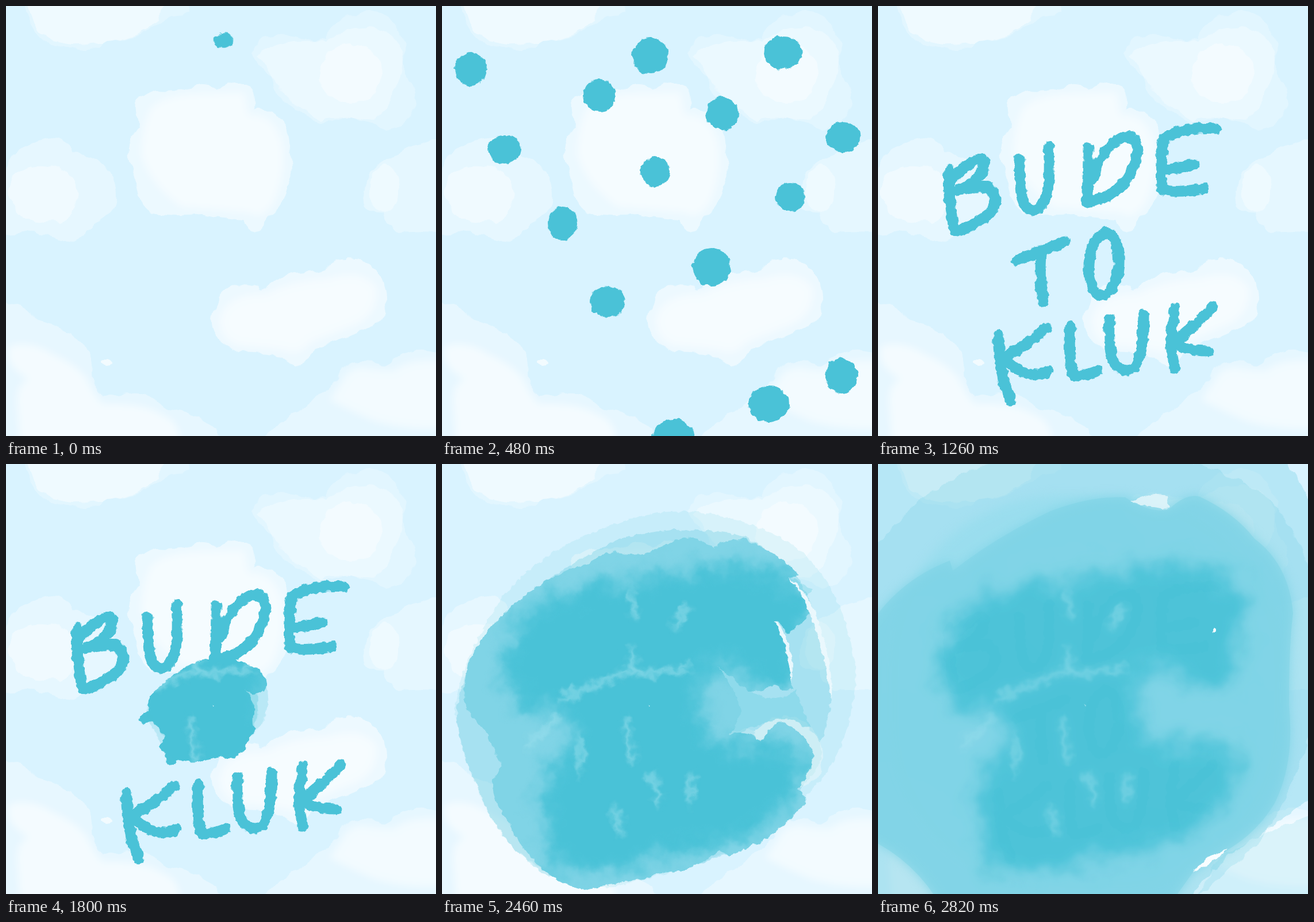
Write an HTML page without scripts that moves like this. It is 748 px wide and 748 px high and loops after 3 s.

```html
<!DOCTYPE html>
<html lang="cs">
<head>
<meta charset="utf-8">
<title>Bude to kluk</title>
<style>
html, body { margin: 0; width: 100%; height: 100%; overflow: hidden; background: #d9f3ff; }
svg { display: block; width: 100%; height: 100%; }
filter { color-interpolation-filters: sRGB; }

.dots ellipse, .ink g, .phase, .grow { animation: 3s -2ms infinite; }

/* --u / --v: drift and fall per 60 ms step, --g: growth per step */
.dots ellipse { fill: #4ac2d7; animation-name: fall; animation-timing-function: steps(17, end); }
@keyframes fall {
  0% { transform: translate(calc(var(--x) - 8 * var(--u)), calc(var(--y) - 8 * var(--v))) scale(calc(1 - 8 * var(--g))); }
  34%, to { transform: translate(calc(var(--x) + 9 * var(--u)), calc(var(--y) + 9 * var(--v))) scale(calc(1 + 9 * var(--g))); }
}

.ink { fill: none; stroke: #4ac2d7; stroke-width: 19; stroke-linecap: round; stroke-linejoin: round; }
.ink g, .phase { animation-timing-function: step-end; }
.ink .w1 { animation-name: w1; }
.ink .w2 { animation-name: w2; }
.ink .w3 { animation-name: w3; }
.ink .w4 { animation-name: w4; }
.ink .w5 { animation-name: w5; }
@keyframes w1 { 0% { visibility: hidden } 34%, to { visibility: visible } }
@keyframes w2 { 0% { visibility: hidden } 36%, to { visibility: visible } }
@keyframes w3 { 0% { visibility: hidden } 38%, to { visibility: visible } }
@keyframes w4 { 0% { visibility: hidden } 40%, to { visibility: visible } }
@keyframes w5 { 0% { visibility: hidden } 42%, to { visibility: visible } }

.pa { animation-name: showA; }
.pb { animation-name: showB; }
.pc { animation-name: showC; }
@keyframes showA { 0% { visibility: hidden } 54% { visibility: visible } 72%, to { visibility: hidden } }
@keyframes showB { 0% { visibility: hidden } 72% { visibility: visible } 84%, to { visibility: hidden } }
@keyframes showC { 0% { visibility: hidden } 84%, to { visibility: visible } }

.grow { transform-origin: 355px 425px; }
.ga { animation-name: growA; }
.gb { animation-name: growB; }
.gc { animation-name: growC; }
@keyframes growA { 0%, 54% { transform: scale(.15); animation-timing-function: steps(9, jump-none) } 72%, to { transform: scale(1) } }
@keyframes growB { 0%, 72% { transform: scale(.73); animation-timing-function: steps(6, jump-none) } 84%, to { transform: scale(1) } }
@keyframes growC { 0%, 84% { transform: scale(.84); animation-timing-function: steps(6, jump-none) } 96%, to { transform: scale(1) } }
</style>
</head>
<body>
<svg viewBox="0 0 748 748" role="img" aria-label="Bude to kluk">
<defs>
  <filter id="rough" filterUnits="userSpaceOnUse" x="-20" y="-20" width="788" height="788">
    <feTurbulence type="fractalNoise" baseFrequency=".09" numOctaves="2" seed="4"/>
    <feDisplacementMap in="SourceGraphic" scale="9" xChannelSelector="R" yChannelSelector="G"/>
  </filter>
  <filter id="puff" filterUnits="userSpaceOnUse" x="-40" y="-40" width="828" height="828">
    <feTurbulence type="fractalNoise" baseFrequency=".045" numOctaves="2" seed="9"/>
    <feDisplacementMap in="SourceGraphic" scale="14" xChannelSelector="R" yChannelSelector="G"/>
  </filter>
  <filter id="mist" filterUnits="userSpaceOnUse" x="-40" y="-40" width="828" height="828">
    <feGaussianBlur stdDeviation="7"/>
  </filter>
  <filter id="soft" filterUnits="userSpaceOnUse" x="-60" y="-60" width="868" height="868">
    <feGaussianBlur stdDeviation="15" result="b"/>
    <feTurbulence type="fractalNoise" baseFrequency=".02" numOctaves="3" seed="2"/>
    <feDisplacementMap in="b" scale="60" xChannelSelector="R" yChannelSelector="G"/>
  </filter>
  <filter id="vein" filterUnits="userSpaceOnUse" x="0" y="0" width="748" height="748">
    <feGaussianBlur stdDeviation="5" result="b"/>
    <feTurbulence type="fractalNoise" baseFrequency=".05" numOctaves="2" seed="6"/>
    <feDisplacementMap in="b" scale="30" xChannelSelector="R" yChannelSelector="G"/>
  </filter>
  <filter id="haze" filterUnits="userSpaceOnUse" x="-60" y="-60" width="868" height="868">
    <feGaussianBlur stdDeviation="9"/>
  </filter>

  <clipPath id="coreA"><path class="grow ga" d="M122 415Q130 380 150 360Q200 310 245 285Q300 245 360 238Q390 234 420 240Q470 245 505 265Q540 280 557 305Q568 330 560 350Q545 370 520 373Q495 365 483 350Q505 375 518 410Q525 440 510 460Q510 490 525 505Q515 515 495 530Q470 570 440 585Q400 610 330 618Q300 630 250 620Q205 605 195 595Q165 570 170 560Q180 545 195 537Q150 490 130 435Z"/></clipPath>
  <clipPath id="coreB"><path class="grow gb" d="M45 348Q70 290 130 240Q190 190 250 175Q280 155 300 152Q330 165 370 150Q410 128 435 127Q455 133 472 147Q490 130 525 131Q580 150 622 193Q612 198 602 198Q630 225 639 260Q620 285 600 295Q590 275 578 272Q605 325 610 390Q600 397 590 393Q580 380 563 390Q545 400 530 393Q500 370 480 352Q510 390 520 430Q510 460 500 470Q530 460 555 482Q575 450 592 448Q635 470 647 505Q640 545 617 565Q635 575 632 590Q600 625 560 655Q520 675 498 682L485 672Q440 700 420 708Q400 705 350 722Q300 730 250 740Q210 735 175 705Q130 660 117 625Q85 580 88 550Q95 535 105 525Q90 500 80 470Q50 440 38 415Q38 380 45 348Z"/></clipPath>
  <clipPath id="coreC"><path class="grow gc" d="M-20 290Q30 205 125 168L130 186Q200 130 300 82Q370 55 430 58Q470 85 505 80Q535 50 560 57Q620 85 655 130Q715 175 722 260Q715 310 715 420Q725 520 690 590Q660 640 610 670L548 710L505 770H110Q65 690 -20 650Z"/></clipPath>

  <g id="paint">
    <rect x="-20" y="-20" width="788" height="788" fill="#80d4e6"/>
    <path filter="url(#soft)" fill="#49c2d7" d="M104 370Q110 300 150 255Q190 215 240 215Q340 195 450 180Q570 165 635 215Q645 270 615 380Q560 395 485 350Q440 370 455 440Q470 500 540 488L630 490Q640 580 540 645Q420 690 330 695Q250 720 205 710Q165 650 178 590Q165 550 200 530Q240 480 200 425Q110 440 104 370Z"/>
    <path filter="url(#vein)" fill="none" stroke="#9adfed" stroke-opacity=".75" stroke-width="9" stroke-linecap="round" d="M330 225L334 268M328 325L335 360M210 410Q260 380 330 362Q400 365 430 355M425 248L405 285M320 445L330 515M200 440L150 490M242 475L238 535M365 540L378 590M302 600L312 640M433 540V585"/>
    <path fill="#c8eff6" d="M358 417l4 3-1 2z"/>
  </g>
</defs>

<rect width="748" height="748" fill="#d9f3ff"/>

<g filter="url(#puff)" fill="#fff">
  <path opacity=".25" d="M32 -12Q40 45 75 65Q105 75 135 78Q165 72 170 62Q215 60 240 45Q270 30 285 18L318 14L322 -12Z"/>
  <path opacity=".45" d="M38 -12Q45 40 78 60Q110 70 140 66Q215 60 240 42Q268 30 285 -12Z"/>
  <path opacity=".25" d="M427 82Q432 60 450 55Q475 47 505 52Q535 62 555 58Q560 40 580 25Q610 10 640 9Q670 14 680 38Q697 60 694 85Q688 100 695 110Q694 130 705 135Q718 165 708 185Q690 212 660 214Q630 200 590 192Q570 203 545 202Q520 195 500 175Q465 155 463 122Q440 108 427 82Z"/>
  <path opacity=".3" d="M437 85Q475 55 555 62Q600 28 650 40Q690 60 690 85Q695 120 672 150Q668 180 640 198Q590 190 545 198Q485 165 463 122Z"/>
  <ellipse opacity=".4" cx="600" cy="118" rx="54" ry="52"/>
  <path opacity=".5" d="M227 170Q240 150 265 147Q300 150 325 142Q345 128 365 145Q385 130 415 135Q435 140 432 180Q460 175 475 192Q492 215 492 240Q500 270 497 290Q488 320 480 345Q470 362 452 368Q450 392 432 393Q418 388 413 374Q375 372 340 364Q290 370 255 360Q225 340 227 300Q212 275 215 245Q220 220 232 208Q225 185 227 170Z"/>
  <path opacity=".35" d="M0 290Q5 270 18 255Q50 230 80 228Q115 232 117 256Q150 258 170 275Q192 300 190 340Q185 365 155 378Q135 405 108 411Q80 405 50 390Q25 398 -12 398V290Z"/>
  <path opacity=".4" d="M5 325Q8 275 65 278Q120 280 125 325Q120 365 95 375Q50 378 30 370Q5 350 5 325Z"/>
  <path opacity=".33" d="M762 230Q700 240 680 260Q635 275 632 300Q615 325 625 350Q640 362 655 360Q660 385 685 395Q715 390 762 394Z"/>
  <ellipse opacity=".35" cx="658" cy="318" rx="24" ry="41"/>
  <path opacity=".52" d="M358 545Q362 510 385 492Q410 478 445 492Q470 470 500 465Q530 465 553 458Q570 437 595 440Q630 440 650 465Q664 490 662 525Q655 550 625 562Q590 580 540 594Q530 622 502 626Q480 615 465 606Q430 600 405 602Q370 590 365 572Q357 560 358 545Z"/>
  <path opacity=".38" d="M-12 510Q35 522 55 545Q110 560 135 590Q155 605 150 640Q150 660 168 682Q200 672 235 674Q262 685 275 698Q320 705 345 722Q378 735 380 762H-12Z"/>
  <ellipse opacity=".65" cx="175" cy="620" rx="9" ry="5"/>
  <path opacity=".35" d="M440 762Q480 720 510 705Q535 680 560 668Q575 650 585 632Q610 608 640 620Q660 628 672 622Q680 605 710 600Q735 598 762 606V762Z"/>
</g>
<g filter="url(#mist)" fill="#fff">
  <path opacity=".48" d="M250 180Q265 157 330 152L415 150L422 190Q465 185 480 235Q490 290 465 345Q440 375 425 360Q370 355 305 350Q250 310 235 260Q235 215 250 180Z"/>
  <path opacity=".48" d="M372 545Q380 500 455 500Q490 478 560 474Q620 455 645 490Q650 540 600 558L530 585Q510 612 480 598L400 590Q370 575 372 545Z"/>
  <path opacity=".55" d="M20 700Q15 655 40 650Q-5 625 5 592Q40 580 80 605Q125 625 142 650Q150 672 168 692Q240 690 270 710Q310 725 300 770H25Z"/>
  <path opacity=".5" d="M562 685Q580 660 592 640Q610 622 640 632L675 634Q700 610 770 618V735Q700 740 640 722Q600 705 562 685Z"/>
</g>

<g class="dots" filter="url(#rough)">
  <ellipse rx="28" ry="28" style="--x:50px;--y:110px;--u:3.2px;--v:92.4px;--g:.02"/>
  <ellipse rx="32" ry="31" style="--x:362px;--y:86px;--u:9.2px;--v:85.2px;--g:.01"/>
  <ellipse rx="33" ry="29" style="--x:593px;--y:81px;--u:6.6px;--v:81.2px;--g:0"/>
  <ellipse rx="28" ry="28" style="--x:274px;--y:155px;--u:4.6px;--v:87.4px;--g:.06"/>
  <ellipse rx="28" ry="29" style="--x:488px;--y:187px;--u:8.2px;--v:90px;--g:.01"/>
  <ellipse rx="29" ry="27" style="--x:698px;--y:228px;--u:-2.6px;--v:83.8px;--g:.01"/>
  <ellipse rx="29" ry="25" style="--x:109px;--y:250px;--u:-1.6px;--v:100.4px;--g:0"/>
  <ellipse rx="26" ry="26" style="--x:371px;--y:288px;--u:7.4px;--v:80.8px;--g:.04"/>
  <ellipse rx="26" ry="25" style="--x:606px;--y:332px;--u:3px;--v:90px;--g:.02"/>
  <ellipse rx="26" ry="29" style="--x:210px;--y:378px;--u:3px;--v:88px;--g:.02"/>
  <ellipse rx="33" ry="33" style="--x:469px;--y:454px;--u:4px;--v:87px;--g:.02"/>
  <ellipse rx="31" ry="27" style="--x:288px;--y:515px;--u:3px;--v:87px;--g:.02"/>
  <ellipse rx="28" ry="30" style="--x:695px;--y:643px;--u:-1px;--v:87px;--g:.02"/>
  <ellipse rx="35" ry="32" style="--x:568px;--y:692px;--u:3px;--v:92px;--g:.03"/>
  <ellipse rx="36" ry="29" style="--x:402px;--y:748px;--u:3px;--v:86px;--g:.065"/>
</g>

<g class="ink" filter="url(#rough)">
  <g class="w1">
    <path d="M124 286C122 320 125 360 134 390M128 304Q150 275 176 267Q190 268 182 288Q168 310 136 322Q178 308 194 318Q213 332 196 360Q172 380 137 392"/>
    <path d="M246 266Q246 325 254 343Q266 366 285 345Q302 325 297 246"/>
  </g>
  <g class="w2">
    <path d="M366 246Q366 300 363 341M374 300Q388 248 424 229Q450 222 451 250Q446 302 404 328Q384 338 364 341"/>
    <path d="M588 213Q530 210 497 230Q491 270 493 317Q508 328 567 317M497 284Q530 282 549 275"/>
  </g>
  <g class="w3">
    <path d="M241 443Q285 425 325 410M284 430Q281 475 288 515"/>
    <ellipse cx="393" cy="449" rx="26" ry="54" transform="rotate(5 393 449)"/>
  </g>
  <g class="w4">
    <path d="M210 572Q208 630 230 686M293 561Q262 586 220 612Q240 638 275 642Q288 642 295 635"/>
    <path d="M334 558Q331 600 338 640Q352 647 381 635"/>
  </g>
  <g class="w5">
    <path d="M403 546Q398 600 412 622Q432 645 450 624Q462 600 462 537"/>
    <path d="M517 526Q504 580 516 630M582 523Q550 560 514 584Q535 600 575 600"/>
  </g>
</g>

<g class="phase pa" filter="url(#rough)">
  <path class="grow ga" fill="#4ac2d7" opacity=".22" d="M122 410Q115 470 150 520Q170 550 185 560Q330 600 480 540Q540 515 565 440Q578 380 562 345Q400 250 150 360Z"/>
  <path class="grow ga" fill="#4ac2d7" opacity=".3" d="M130 420Q145 480 185 535Q340 600 500 520Q545 460 530 375L480 340Z"/>
  <g clip-path="url(#coreA)"><use href="#paint"/></g>
</g>

<g class="phase pb" filter="url(#rough)">
  <path class="grow gb" fill="#4ac2d7" opacity=".12" d="M22 430Q30 340 110 225Q200 120 380 84Q500 75 600 135Q700 200 720 360Q715 500 635 575Q560 680 300 735Q180 740 100 640Q40 540 22 430Z"/>
  <path class="grow gb" fill="#4ac2d7" opacity=".26" d="M25 440Q30 500 70 580Q100 660 180 715Q400 740 580 640Q660 520 678 410Q670 280 620 200Q560 130 500 120Q400 105 310 130Q200 180 110 260Q30 350 25 440Z"/>
  <path class="grow gb" fill="#4ac2d7" opacity=".25" d="M480 350Q570 440 615 390L640 460Q570 430 500 480ZM602 196L645 218L630 232Z"/>
  <g class="grow gb" fill="#eaf8fd">
    <path d="M602 198Q640 220 660 290Q680 350 678 410Q660 300 636 252Z"/>
    <path d="M578 272Q600 285 610 345L609 392Q604 325 578 272Z"/>
    <path fill="#cdeef5" d="M540 470Q585 425 630 455Q665 480 660 510Q650 545 620 563Q660 500 592 448Q570 460 555 482Z"/>
  </g>
  <g clip-path="url(#coreB)"><use href="#paint"/></g>
</g>

<g class="phase pc">
  <g filter="url(#puff)" fill="#4ac2d7">
    <path class="grow gc" opacity=".24" d="M-60 430V-60H660Q740 10 790 160V560Q720 600 660 650Q590 680 520 790H-60Z"/>
    <path class="grow gc" opacity=".16" d="M-40 200Q60 20 260 -20Q520 -50 680 60Q750 130 790 330Q740 560 660 660L520 790H-40Z"/>
    <path class="grow gc" opacity=".14" d="M540 790L590 690Q660 640 790 600V790Z"/>
  </g>
  <g filter="url(#haze)">
    <g opacity=".5"><rect class="grow gc" x="20" y="55" width="685" height="690" rx="300" fill="#8fdaea"/></g>
    <g clip-path="url(#coreC)" opacity=".88"><use href="#paint"/></g>
  </g>
  <g clip-path="url(#coreC)" opacity=".55"><use href="#paint"/></g>
  <g class="grow gc" fill="#e4f6fb" filter="url(#rough)">
    <path opacity=".85" d="M440 66Q470 48 503 55L508 78Q470 76 440 66Z"/>
    <path fill="#f8fdff" d="M548 711Q565 685 608 670Q590 690 548 711Z"/>
    <ellipse fill="#f4fcff" cx="585" cy="289" rx="3" ry="4"/>
  </g>
</g>
</svg>
</body>
</html>
```
